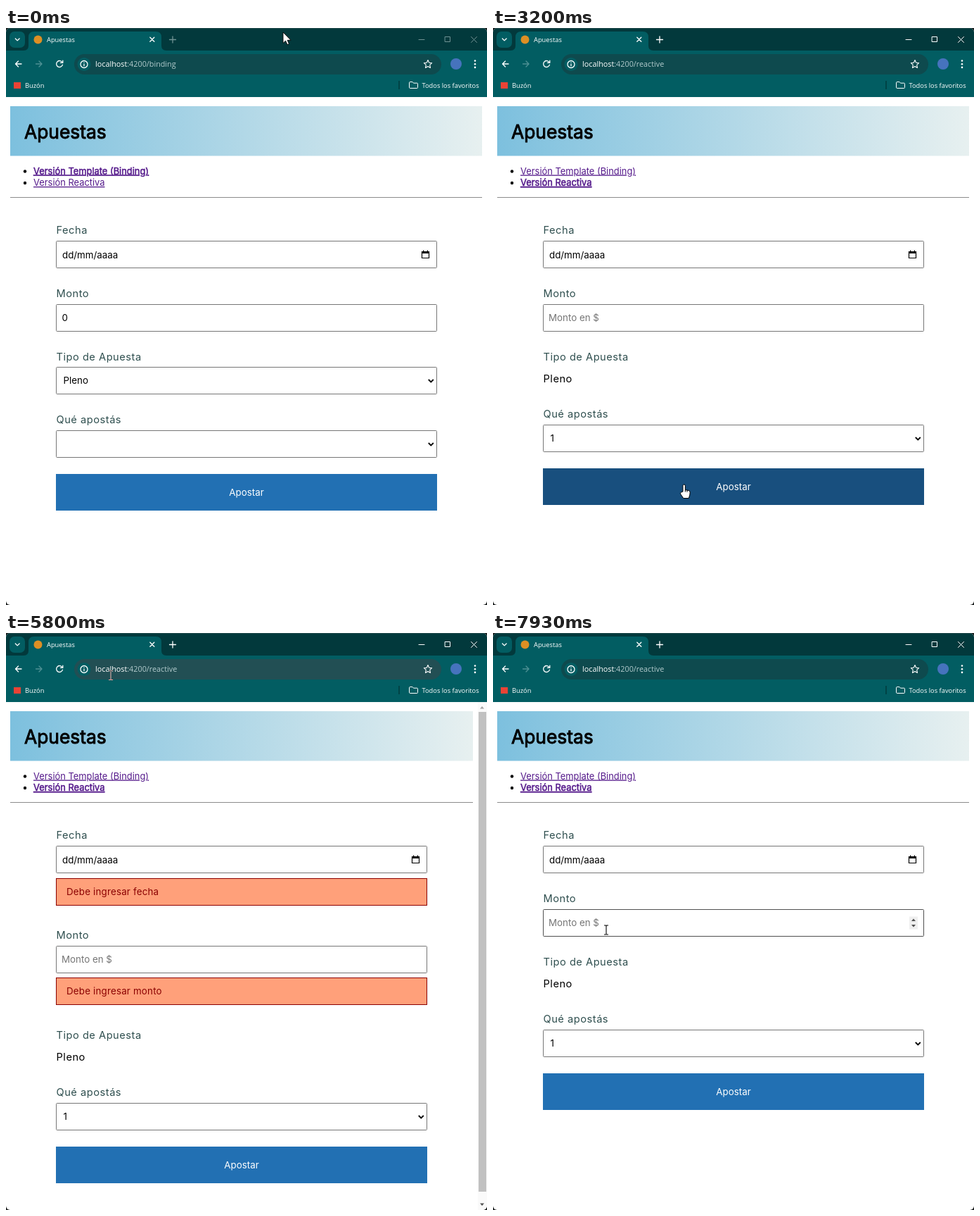
Write an HTML page that moves like this. It is 684 px wide and 819 px high and loops after 8 s.

```html
<!DOCTYPE html>
<html lang="es">
<head>
<meta charset="utf-8">
<title>Apuestas</title>
<style>
html, body { margin: 0; width: 100%; height: 100%; overflow: hidden; background: #1a1d1d; }
svg { display: block; width: 684px; height: 819px; }
text { white-space: pre; }
.ui { font-family: "Open Sans", "Noto Sans", sans-serif; font-size: 9.3px; fill: #fff; }
.url { font-size: 10.8px; }
.page { font-family: Inter, sans-serif; font-size: 13.33px; fill: #000; }
.title { font-size: 26.4px; stroke: #000; stroke-width: .9px; }
.link { font-size: 12.88px; fill: #551a8b; text-decoration: underline; }
.on { stroke: #551a8b; stroke-width: .5px; }
.label { font-size: 14.67px; letter-spacing: .5px; }
.error { letter-spacing: .2px; fill: #8b0000; }
.line { fill: none; stroke: #fff; stroke-width: 1.3; stroke-linecap: round; stroke-linejoin: round; }
</style>
</head>
<body>
<svg viewBox="0 0 684 819">
  <defs>
    <linearGradient id="banner">
      <stop offset="0" stop-color="#7dc0de"/>
      <stop offset="1" stop-color="#e7f0f0"/>
    </linearGradient>
    <clipPath id="window"><rect width="684" height="819" rx="6"/></clipPath>
  </defs>
  <g clip-path="url(#window)">
    <rect width="684" height="819" fill="#fff"/>
    <rect width="684" height="98" fill="#02393c"/>
    <rect width="684" height="1" fill="#2a4f51"/>
    <rect y="32" width="684" height="66" fill="#025d62"/>
    <path d="M25 32q7 0 7-7V13q0-8 8-8H213q8 0 8 8v12q0 7 7 7z" fill="#025d62"/>
    <rect x="5" y="5" width="22" height="23" rx="7" fill="#025d62"/>
    <path class="line" d="M13.300 15l2.900 2.900 2.900-2.900"/>
    <circle cx="45.500" cy="16.500" r="6" fill="#dd8f24"/>
    <text class="ui" x="58" y="20">Apuestas</text>
    <path class="line" d="M204.800 13.300l6 6m0-6l-6 6"/>
    <path class="line" id="plus" d="M232.500 16.500h9m-4.500-4.500v9"/>
    <path class="line" id="controls" stroke-linecap="butt" style="stroke-width:1"
      d="M587 16.500h8M624.500 12.500h7v7h-7zM661.500 12.500l8 8m0-8l-8 8"/>
    <rect id="bar" x="97" y="37" width="522" height="29" rx="14.500"/>
    <path class="line" d="M22 51h-8.500m4-4l-4 4 4 4"/>
    <path class="line" style="stroke:#4f9094" d="M42.500 51h8.500m-4-4l4 4-4 4"/>
    <path class="line" d="M80.200 49a4.500 4.500 0 1 0 .3 3.200M80.800 46.200v3.200h-3.300"/>
    <circle cx="111" cy="51.500" r="9.500" fill="#025d62"/>
    <circle class="line" cx="111" cy="51.500" r="5"/>
    <path class="line" d="M111 51.200v2.600M111 49v.1"/>
    <path class="line" style="stroke-width:1.100"
      d="M600 45.500l1.700 3.700 4 .5-3 2.700.8 4-3.500-2-3.500 2 .8-4-3-2.700 4-.5z"/>
    <circle cx="640" cy="51" r="8" fill="#4673bd"/>
    <g fill="#fff"><circle cx="667" cy="46.500" r="1.300"/><circle cx="667" cy="51.200" r="1.300"/><circle cx="667" cy="55.900" r="1.300"/></g>
    <rect x="11" y="77" width="10" height="9" fill="#ea4335"/>
    <text class="ui" x="27" y="84.500">Buzón</text>
    <path d="M559 75v12" stroke="#023b3e" stroke-width="1.500"/>
    <path class="line" style="stroke-width:1" d="M573.500 77.500q0-1 1-1h3.500l1.500 1.700h5q1 0 1 1v5.300q0 1-1 1h-10q-1 0-1-1z"/>
    <text class="ui" x="591.500" y="84.500">Todos los favoritos</text>
    <text class="ui url" x="127" y="55.300">localhost<tspan id="path" fill="#b3cbcd"></tspan></text>
    <g id="page"></g>
    <g id="status">
      <path d="M0 802h105q3 0 3 3v14H0z" fill="#02393c"/>
      <text class="ui" id="target" x="4" y="814"></text>
    </g>
  </g>
  <g id="cursor" style="mix-blend-mode:normal"></g>
</svg>
<script>
const $ = id => document.getElementById(id);
const LOOP = 8000, STEP = 1000 / 15;

// Pointer stops: time, x, y
const stops = [
  [0, 394, 6], [133, 394, 6], [1000, 115, 221], [1066, 115, 220],
  [1533, 115, 220], [2400, 190, 410], [2600, 190, 410],
  [3200, 272, 648], [3333, 276, 664], [3466, 282, 655],
  [3800, 262, 366], [4130, 309, 643], [4200, 310.5, 643],
  [4733, 310.5, 643], [4866, 312, 651], [5600, 152, 72],
  [5800, 149, 60], [6200, 152, 209], [6667, 152, 209],
  [6933, 134.5, 213], [7133, 120, 218], [7333, 120, 218],
  [7933, 161, 421.5], [8000, 161, 421.5]
];

const shapes = {
  arrow: '<path d="M0 0V15.500L3.600 12.200 6 17.600 8.500 16.500 6.200 11.300H11z" fill="#fff" stroke="#000" stroke-width=".9"/>',
  hand: '<path d="M-2 10V1.700a1.700 1.700 0 0 1 3.400 0V7.500l4.800 1q2 .5 2 2.500l-.4 4-1.500 4.500h-7.500L-5.300 13.500q-1-2 1-2.500z' +
    'M1.400 7.500v3M4 8v2.800" fill="#fff" stroke="#000" stroke-width="1" stroke-linejoin="round"/>',
  beam: '<path d="M-3-6.500h2.200L0-6 .8-6.500H3M0-6V6M-3 6.500h2.200L0 6l.8.5H3" fill="none" stroke="#fff" stroke-width="1.100"/>'
};

function pointerAt(t) {
  const i = Math.max(1, stops.findIndex(s => s[0] >= t));
  const [t0, x0, y0] = stops[i - 1], [t1, x1, y1] = stops[i];
  const p = (t - t0) / (t1 - t0), e = p * p * (3 - 2 * p);
  return { x: x0 + (x1 - x0) * e, y: y0 + (y1 - y0) * e };
}

const inside = (p, x0, y0, x1, y1) => p.x >= x0 && p.x < x1 && p.y >= y0 && p.y < y1;

const text = (x, y, value, cls = '', extra = '') =>
  `<text class="page ${cls}" x="${x}" y="${y}" ${extra}>${value}</text>`;
const label = (y, value) => text(71.5, y, value, 'label', 'style="fill:#2f4f4f"');
const rect = (x, y, w, h, fill, extra = '') =>
  `<rect x="${x}" y="${y}" width="${w}" height="${h}" fill="${fill}" ${extra}/>`;

function drawPage(p, reactive, errors) {
  const right = errors ? 599 : 613, edge = errors ? 664 : 677;
  const gap = errors ? 52 : 0;
  const over = (y, h) => inside(p, 71, y, right, y + h);

  const field = y => rect(71.5, y + .5, right - 72, 38, '#fff',
    `rx="1" stroke="${over(y, 39) ? '#4f4f4f' : '#767676'}"`);
  const select = (y, value) => field(y) + text(81.5, y + 24, value) +
    `<path d="M${right - 12.2} ${y + 18}l3.500 3.500 3.500-3.500" fill="none" stroke="#000" stroke-width="1.800"/>`;
  const error = (y, value) =>
    rect(71.5, y + .5, right - 72, 38, '#ffa07a', 'stroke="#8b0000"') + text(86, y + 24, value, 'error');
  const link = (y, value, on) =>
    `<circle cx="27" cy="${y - 4}" r="2.200"/>` + text(39, y, value, on ? 'link on' : 'link');

  let out = rect(6, 111, edge - 6, 70.5, 'url(#banner)') +
    text(26, 156.5, 'Apuestas', 'title') +
    link(207.5, 'Versión Template (Binding)', !reactive) +
    link(224, 'Versión Reactiva', reactive) +
    rect(6, 240, edge - 6, 1, '#8c8c8c');

  // Date
  const cal = right - 21.5;
  out += label(292, 'Fecha') + field(302) + text(80, 326.5, 'dd/mm/aaaa') +
    `<path d="M${cal} 317.500h10v9h-10z" fill="none" stroke="#000" stroke-width="1.200"/>` +
    rect(cal - .5, 317, 11, 3, '#000') + rect(cal + 1.5, 315.5, 1.3, 2, '#000') + rect(cal + 7.3, 315.5, 1.3, 2, '#000');
  if (errors) out += error(348, 'Debe ingresar fecha');

  // Amount
  const my = 392 + gap, onAmount = over(my, 39);
  out += label(382 + gap, 'Monto') + field(my) +
    (reactive ? text(79, my + 24, 'Monto en $', '', 'style="fill:#757575"') : text(79.5, my + 24, '0'));
  if (onAmount) {
    const sx = right - 15, sy = my + 19.5;
    out += rect(sx - 6, sy - 9, 12, 18, '#efefef') +
      `<path d="M${sx - 3} ${sy - 2.500}h6l-3-3.500zM${sx - 3} ${sy + 2.500}h6l-3 3.500z" fill="#505050"/>`;
  }
  if (errors) out += error(489, 'Debe ingresar monto');

  // Bet
  const shift = gap * 2, drop = reactive ? shift : 8;
  out += label(471.5 + shift, 'Tipo de Apuesta') +
    (reactive ? text(71.5, 502.5 + shift, 'Pleno', 'label') : select(481, 'Pleno')) +
    label(553 + drop, 'Qué apostás') + select(563 + drop, reactive ? '1' : '');

  const by = 625 + drop, onButton = over(by, 52);
  out += rect(71, by, right - 71, 52, onButton ? '#184f7e' : '#2270b3') +
    text((71 + right) / 2, by + 31, 'Apostar', '', 'text-anchor="middle" style="fill:#fff"');

  if (errors) {
    out += rect(671, 98, 13, 721, '#fafafa') + rect(672, 112, 11, 681, '#c1c1c1') +
      '<path d="M674 107.500h6l-3-3.500z" fill="#a3a3a3"/><path d="M674 809.500h6l-3 3.500z" fill="#505050"/>';
  }
  $('page').innerHTML = out;
  return { onAmount, onButton };
}

function render(t) {
  const p = pointerAt(t);
  const reactive = t > 1325 && t < 6460 || t > 7260;
  const errors = t > 4390 && t < 6460;
  const active = t > 1260;
  const { onAmount, onButton } = drawPage(p, reactive, errors);

  const onBar = inside(p, 97, 37, 619, 66);
  const hovered = inside(p, 39, 195, 204, 211) ? 'binding'
    : inside(p, 39, 211, 141, 228) ? 'reactive' : '';

  $('path').textContent = ':4200/' + (reactive ? 'reactive' : 'binding');
  $('bar').setAttribute('fill', onBar ? '#224f54' : '#0e4a4e');
  $('plus').style.stroke = $('controls').style.stroke = active ? '#fff' : '#709394';

  const showStatus = hovered && (active && t < 5000 || t > 6390);
  $('status').style.display = showStatus ? '' : 'none';
  $('target').textContent = 'localhost:4200/' + hovered;

  const kind = onBar || onAmount ? 'beam' : hovered || onButton ? 'hand' : 'arrow';
  const cursor = $('cursor');
  cursor.innerHTML = shapes[kind];
  cursor.setAttribute('transform', `translate(${p.x.toFixed(1)} ${p.y.toFixed(1)})`);
  cursor.style.mixBlendMode = kind === 'beam' ? 'difference' : 'normal';
}

let last = -1;
const start = performance.now();
function tick(now) {
  const t = Math.max(0, now - start) % LOOP;
  const step = Math.min(Math.floor((t + 4) / STEP), LOOP / STEP - 1);
  if (step !== last) render((last = step) * STEP);
  requestAnimationFrame(tick);
}
tick(start);
</script>
</body>
</html>
```
